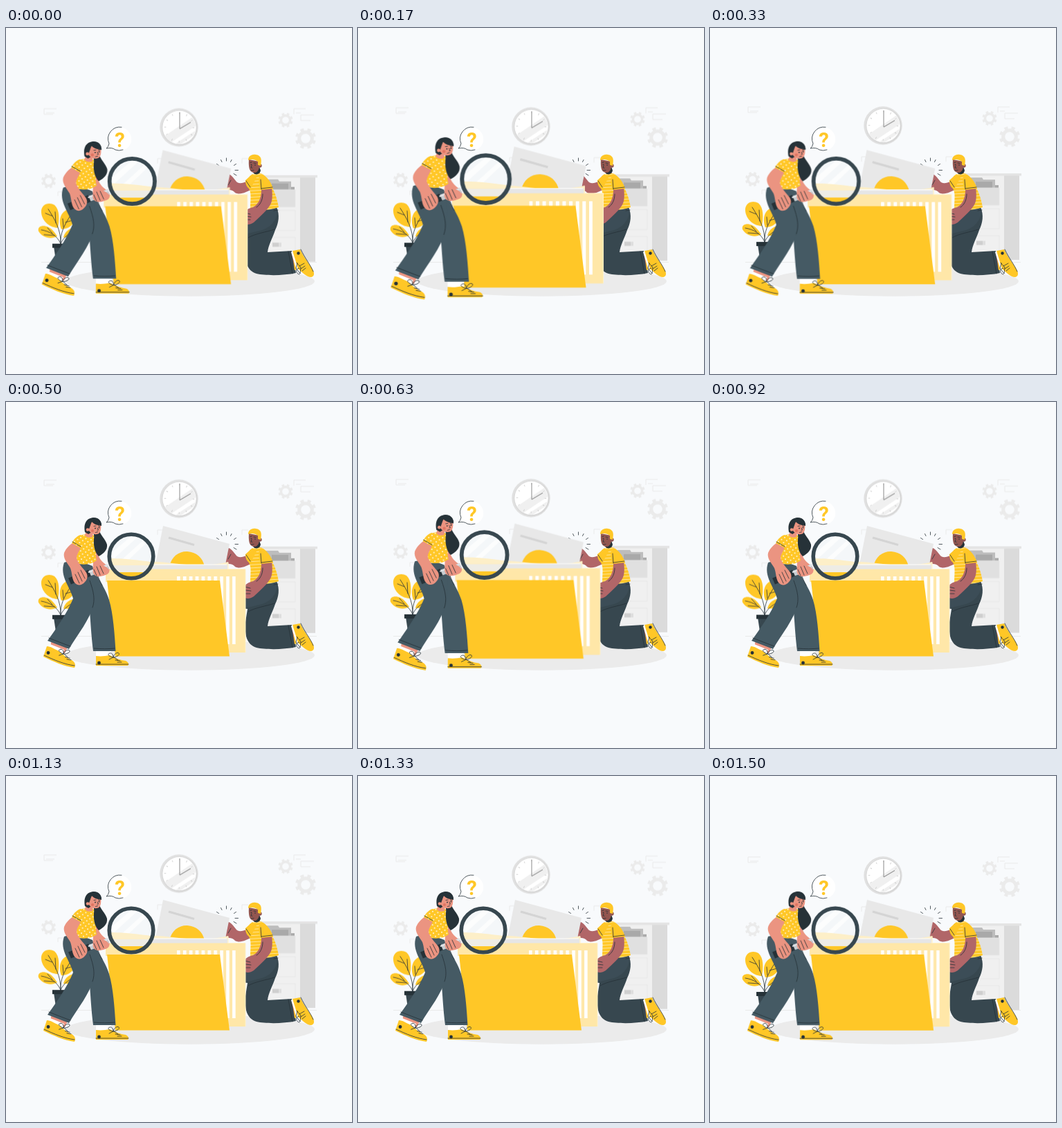
These frames come from a looping animation (500 by 500 pixels, 1540 ms). An HTML page:

```html
<!DOCTYPE html>
<html lang="en">
<head>
<meta charset="utf-8">
<title>Searching the folder</title>
<style>
html, body { margin: 0; width: 100%; height: 100%; overflow: hidden; background: #f8fafc; }
svg { display: block; width: 100%; height: 100%; }
.float, .beat { animation: float 1540ms linear -41ms infinite; }
.beat { animation-name: beat; }
#folder { transform-origin: 243px 273px; }
#woman { transform-origin: 136px 280px; }
@keyframes float {
  0%, 100% { transform: translateY(0); }
  50% { transform: translateY(-6px); }
}
@keyframes beat {
  0%, 30%, 40%, 60%, 100% { transform: scale(1); }
  10%, 50% { transform: scale(1.1); }
}
.y { fill: #ffc727; }
.ink { fill: #263238; }
.denim { fill: #455a64; }
.navy { fill: #37474f; }
.skin { fill: #eb9481; }
.brown { fill: #b16668; }
.face { fill: #935650; }
.g1 { fill: #ebebeb; }
.g2 { fill: #e0e0e0; }
.w { fill: #fff; }
.ln { fill: none; stroke: #263238; stroke-width: .8; stroke-linecap: round; stroke-linejoin: round; }
.thin { fill: none; stroke: #e6e6e6; stroke-width: .8; }
</style>
</head>
<body>
<svg viewBox="0 0 500 500">
<defs>
  <pattern id="dots" width="7.6" height="7.6" patternUnits="userSpaceOnUse" patternTransform="rotate(12)">
    <rect class="y" width="7.6" height="7.6"/>
    <circle class="w" cx="1.9" cy="1.9" r=".9"/><circle class="w" cx="5.7" cy="5.7" r=".9"/>
  </pattern>
  <pattern id="bands" width="10" height="4.6" patternUnits="userSpaceOnUse" patternTransform="rotate(-3)">
    <rect class="y" width="10" height="4.6"/><rect fill="#fff0bd" width="10" height=".7"/>
  </pattern>
  <pattern id="bars" x="247" width="8.9" height="10" patternUnits="userSpaceOnUse">
    <rect class="w" width="4.6" height="10"/>
  </pattern>
  <g id="gear" fill="none" stroke="#ebebeb" transform="rotate(11.25)">
    <circle r="9.3" stroke-width="5"/>
    <circle r="13" stroke-width="4" pathLength="16" stroke-dasharray="1 1"/>
  </g>
  <g id="bow" class="ln">
    <path d="M0 0C-7-1-9-5-5-6S0-2 0 0C1-5 6-8 8-6S5 0 0 0M0 0l-6 3M1 0l6 4M3 4l7 1M6 7l6 0"/>
  </g>
  <clipPath id="lens"><circle cx="181" cy="223" r="30"/></clipPath>
  <clipPath id="dial"><circle cx="250" cy="144" r="24"/></clipPath>
</defs>

<path class="thin" d="M51 338.5H449"/>
<ellipse class="g1" cx="266" cy="366" rx="180" ry="21.7"/>

<g class="float">
  <path class="thin" d="M55 117h18M55 117v8h13M416 125v-8h17M426 134v-8h19M426 134h14M219 196v-7h8M341 196v-7h9M75 243v-6h8M58 123h12M419 123h7"/>
  <use href="#gear" transform="translate(404 133.5) scale(.71)"/>
  <use href="#gear" transform="translate(433 160)"/>
  <use href="#gear" transform="translate(61.5 221.5) scale(.71)"/>

  <!-- clock -->
  <circle class="g2" cx="250" cy="144" r="27.7"/>
  <circle cx="251" cy="144.5" r="25.5" fill="#d6d6d6"/>
  <circle class="w" cx="250.5" cy="144" r="24.2"/>
  <g clip-path="url(#dial)">
    <path fill="#f0f0f0" d="M224 160l50-34v16l-42 28zM238 172l40-26v5l-36 24z"/>
  </g>
  <circle cx="250.5" cy="144" r="20.5" fill="none" stroke="#c7c7c7" stroke-width="2.6" pathLength="120" stroke-dasharray=".7 9.3"/>
  <path d="M251 146V122M251 146L267 136.500" fill="none" stroke="#959595" stroke-width="1.1"/>

  <!-- cabinet -->
  <path fill="#f0f0f0" d="M366 216h60v122h-60z"/>
  <path fill="#dbdbdb" d="M425 216h22v122h-22z"/>
  <path fill="#e4e4e4" d="M363 213h87v3.5h-87z"/>
  <path fill="#bdbdbd" d="M375 219h18l2 3h17v12h-37z"/>
  <path fill="#a9a9a9" d="M384 225h24v9h-24zM412 230h5v5h-5z"/>
  <path class="g2" d="M378 234h40v25h-40z"/>
  <path class="thin" d="M378 234h40v25h-40M380 264h38v29h-38M380 303h38v28h-38"/>
  <path fill="#cfcfcf" d="M385 310.500h9v6h-9z"/><path fill="#dedede" d="M394 310.500h4v6h-4z"/>

  <!-- plant -->
  <g class="y">
    <path d="M75 289C64 289 52 280 51 267C50 255 62 251 70 256C78 263 77 278 75 289z"/>
    <path d="M80 291C75 278 79 265 91 262C103 261 104 276 97 283C92 289 86 291 80 291z"/>
    <path d="M74 301C66 306 53 304 47 294C45 287 53 284 61 288C68 291 71 297 74 301z"/>
    <path d="M83 303C85 293 95 287 106 289C108 298 96 304 83 303z"/>
  </g>
  <path class="ln" d="M79 313C80 292 70 276 61 262M79 311C78 298 84 285 94 270M79 312C74 300 63 294 51 292M79 312C83 302 93 296 102 292M72 282L71 266M67 272L57 268M83 288L82 276M86 281L97 278M67 297L60 289M70 300L55 299"/>
  <path class="navy" d="M69 316h20l-3 20H72z"/><path class="ink" d="M67 312h24v6H67z"/>
</g>

<!-- speech bubble -->
<path class="w" d="M149 168A17 17 0 1 1 160 177Q154 172 145 174Q149 172 149 168z"/>
<path class="ln" d="M167 143.300A17 17 0 0 0 149 167Q148 172 145 174Q153 172 158 176Q163 178 169 176"/>
<text class="y" x="164.500" y="171.500" font-family="Roboto, sans-serif" font-size="29" font-weight="700" text-anchor="middle">?</text>

<!-- man -->
<g>
  <path class="ln" d="M304.500 196.500l3 2M310.500 190.500l1.500 3M318.500 188v4M326 190.500l-1.500 3M332.500 196.500l-3 2M331 205.500h4.500M329 210.500l4 2.500"/>
  <path class="navy" d="M351 262L391 259C396 270 394 282 389 292C385 304 379 314 378 324L413 322L419 354C401 358 375 358 362 355C347 350 345 336 346 318L349 299L340 298V270z"/>
  <path class="denim" d="M352 262L391 260C394 272 387 286 370 292L341 299V281z" opacity=".35"/>
  <path class="ln" d="M388 291C376 295 360 297 350 303M387 264L393 263M408 323L414 355" stroke="#192126"/>
  <path class="brown" d="M413 326l4-2 2 20-2 6z"/>
  <path class="y" d="M414 322L425 320C430 331 438 340 443 349C446 354 446 359 441 360C434 360 427 352 422 348L417 350z"/>
  <path class="w" d="M414 322l-2 2 8 26 2-2z"/>
  <circle class="ink" cx="422.500" cy="325.500" r="2.200"/>
  <path class="ln" d="M426 320C432 333 440 342 444 352M421 340l-2 7 6 8 1-9-6-7M424 344l7-4M426 348l6-4M428 351l5-4M424 347c-6 0-6 8 0 9"/>
  <path class="brown" d="M353 219C345 223 340 226 334 223C331 220 326 212 322 211C317 213 318 221 315 229C318 236 327 232 331 238C338 242 348 237 355 233z"/>
  <path class="ln" d="M320 215l-2 8M325 220l-4 7" stroke="#7d4031"/>
  <path class="face" d="M357 201l8 0 2 11-7 4z"/>
  <path d="M352 214C359 210 365 209 371 211C382 222 391 240 394 259C380 264 364 264 353 260C353 247 355 239 351 232z" fill="url(#bands)"/>
  <path class="y" d="M346 220L356 211L362 216L353 233C348 231 346 226 346 220z"/>
  <path class="brown" d="M369 227L384 229C385 240 386 250 381 257C374 267 364 275 358 281C352 285 346 285 344 281L342 270C345 263 352 260 357 259C366 254 370 244 369 227z"/>
  <path class="ln" d="M345 267l8 2M346 272l8 1M346 277l7 0M371 240c0 9-4 16-9 19" stroke="#7d4031"/>
  <path class="y" d="M368 211C377 213 383 223 386 232L368 234C365 225 364 217 368 211z"/>
  <path class="ln" d="M369 232l16-2M347 221l6 9M368 219l1 14" stroke="#6b5310"/>
  <path class="ink" d="M356 207C360 209 364 206 366 200L368 206C367 211 362 213 358 210z"/>
  <path class="face" d="M351 190L366 193C367 202 365 208 360 209C353 209 350 205 351 190z"/>
  <circle class="face" cx="367" cy="199" r="2.700"/>
  <path class="y" d="M350 191C350 186 354 182 361 183C369 184 370 190 368 199L364 198L364 193C360 190 355 189 350 191z"/>
  <path class="ln" d="M353 194.500l2-.5M358 195l3 .5M355 199l-1 3 2 .3M354 206l4-.5"/>
  <circle class="ink" cx="354.500" cy="197.500" r=".8"/><circle class="ink" cx="360" cy="198" r=".8"/>
</g>

<g id="folder" class="beat">
  <path fill="#e8e8e8" d="M227 179L323 205L315 245L215 240z"/>
  <path d="M235 196L272 206.500" stroke="#d4d4d4" stroke-width="3"/>
  <path class="y" d="M236 238C239 223 250 215.500 262 216C275 217 284 224 287 238z"/>
  <path fill="#fdefc8" d="M162 225.500C188 230 220 230 250 234C277 237 303 236 321 231L320 255H160z"/>
  <path fill="#e6e6e6" d="M160 235H320V242H160z"/>
  <path class="w" d="M208 234.500h111v1h-111z"/>
  <path fill="#ffe7a8" d="M144 241.500H346V362H236V260H144z"/>
  <path d="M321 231.500V241.500H346V362" fill="none" stroke="#fff0c6"/>
  <path d="M247 252H332V350H247z" fill="url(#bars)"/>
  <path class="y" d="M146 258H309L323 367.500H158z"/>
</g>

<g id="woman" class="beat">
  <!-- magnifier -->
  <g clip-path="url(#lens)">
    <path fill="#f4f6f8" d="M150 190h64v68h-64z" opacity=".85"/>
    <path class="w" d="M150 220l38-32h10l-44 40zM165 230l42-38 4 4-38 36z" opacity=".65"/>
    <path fill="#fdefc8" d="M150 226C172 226 196 229 215 232V248H150z"/>
    <path fill="#eeece5" d="M150 236H215V247H150z"/>
    <path class="y" d="M150 246H203L212 260H150z"/>
  </g>
  <circle cx="181" cy="223" r="31.800" fill="none" stroke="#37474f" stroke-width="5.600"/>

  <!-- shoes and ankles -->
  <path class="skin" d="M66 343l24 9-5 11-21-9z"/>
  <path class="w" d="M64 350l20 8-3 8-20-10zM130 357h22v12h-22z"/>
  <path class="y" d="M59 353C65 353 69 357 75 359C82 364 87 370 95 373C100 376 101 380 99 384C84 382 68 375 54 368z"/>
  <path class="y" d="M130 367C138 368 143 367 150 366C158 370 165 373 173 374C177 376 178 379 176 381H130z"/>
  <path class="ln" d="M55 366C70 373 84 379 99 381M130 379H177"/>
  <circle class="ink" cx="61" cy="362.500" r="2.400"/><circle class="ink" cx="134.500" cy="377" r="2.400"/>
  <use href="#bow" transform="translate(83 364) rotate(8)"/>
  <use href="#bow" transform="translate(155 369)"/>

  <!-- trousers -->
  <path class="denim" d="M104 232L129 240C130 254 142 264 149 286C155 306 157 337 158.500 360H126C123 337 122 312 120 290z"/>
  <path class="denim" d="M84 232C94 229 111 231 125 237C130 253 130 275 127 292C121 315 104 335 91 357L60 345C72 328 88 306 97 284C93 267 77 252 84 232z"/>
  <path class="ln" d="M121 258C127 275 129 286 125 297M62 341C72 345 82 349 93 353M127 356C137 357 148 357 157 356M131 246C133 252 135 258 139 265"/>

  <!-- body -->
  <path class="skin" d="M130 212L134 223C137 230 143 234 147 237C151 241 150 247 146 249C139 252 128 251 126 244C125 237 127 231 125 222z"/>
  <path d="M110 192C104 194 100 199 98 206C100 214 102 222 101 233C112 236 123 235 131 229C128 219 132 210 132 201C130 195 126 191 121 190z" fill="url(#dots)"/>
  <path class="ink" d="M134 183C136 193 144 198 146 206C147 214 141 219 134 223C130 219 126 211 127 198C128 193 126 188 126 186z"/>
  <path class="skin" d="M117 184L126 188L125 195C119 197 115 195 114 192z"/>

  <!-- handle -->
  <path d="M148 238L117 249" stroke="#c9ced2" stroke-width="8"/>
  <path d="M121 247L92 259" stroke="#263238" stroke-width="10"/>
  <path d="M147 236L119 246" stroke="#e3e7ea" stroke-width="2"/>

  <!-- hands -->
  <path class="skin" d="M99 202L108 210C106 216 102 220 102 226C105 234 111 240 115 245C119 250 118 256 114 260C110 265 104 266 100 262C95 257 96 248 93 240C89 233 82 226 84 218C87 211 92 206 99 202z"/>
  <path class="ln" d="M104 246l6 13M108 243l6 12M100 249l6 13" stroke="#a94f43"/>
  <path class="skin" d="M127 238C131 234 137 234 142 237C149 240 151 245 147 248C141 252 132 254 128 250C125 247 125 242 127 238z"/>
  <path class="ln" d="M131 238l5 12M136 237l5 11M127 242l4 9" stroke="#a94f43"/>
  <path d="M108 192C103 193 98 198 95 204L108 211C112 204 113 197 108 192z" fill="url(#dots)"/>
  <path class="ln" d="M96 202l12 7" stroke="#826214"/>

  <!-- head -->
  <path class="ink" d="M114 188C112 178 115 170 122 168C130 165 138 170 138 178L130 184L119 191z"/>
  <path class="skin" d="M119 176C125 171 134 172 137 177C138 185 136 191 131 191C126 192 121 189 119 184z"/>
  <path class="ink" d="M117 185C114 175 117 169 124 168C133 166 138 171 138 179C133 178 127 177 124 173C122 177 121 182 119 186z"/>
  <circle class="skin" cx="118" cy="184.500" r="2.300"/>
  <circle cx="125" cy="186" r="2.100" fill="#d9614f" opacity=".6"/>
  <circle class="ink" cx="129" cy="182.500" r=".9"/><circle class="ink" cx="134.500" cy="181.500" r=".9"/>
  <path class="ln" d="M127 179.500l3-.5M133.500 179l2 .5M132 182l1.500 3-1.500.3M129.500 188.500l3-.8"/>
</g>
</svg>
</body>
</html>
```
